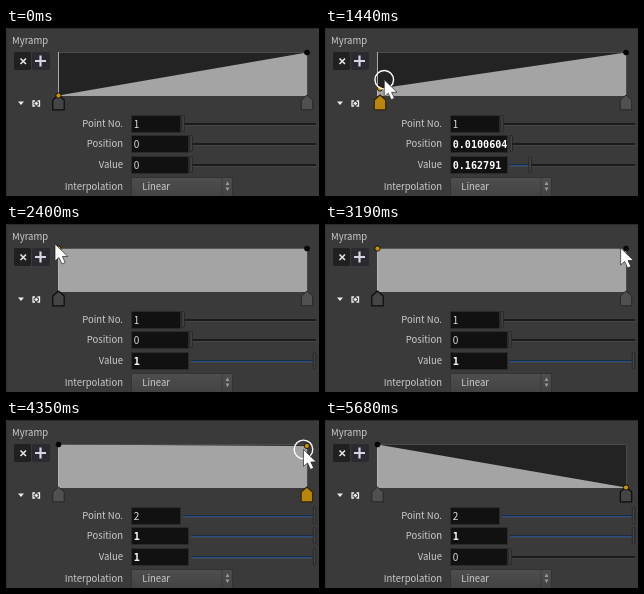
Recreate the animation shown at these times as an HTML page. Size 313 px wide and 168 px high, loop 6360 ms.

```html
<!DOCTYPE html>
<html lang="en">
<head>
<meta charset="utf-8">
<title>Ramp editor</title>
<style>
  html, body { margin: 0; width: 100%; height: 100%; overflow: hidden; background: #3a3a3a; }
  svg { display: block; width: 100vw; height: 100vh; }
  text { font: 9.5px "Noto Sans CJK JP", "Noto Sans CJK SC", "Noto Sans CJK", "Open Sans", sans-serif; fill: #ccc; }
  .label { text-anchor: end; }
  .value { font-size: 10px; fill: #e2e2e2; }
  .value.bold { font: bold 10.1px "DejaVu Sans Mono", monospace; fill: #fff; }
</style>
</head>
<body>
<svg viewBox="0 0 313 168">
  <defs>
    <linearGradient id="menu" x1="0" y1="0" x2="0" y2="1">
      <stop offset="0" stop-color="#4e4e4e"/><stop offset="1" stop-color="#424242"/>
    </linearGradient>
  </defs>
  <rect width="313" height="168" fill="#3a3a3a"/>
  <path d="M0 .5H313" stroke="#2b2b2b"/>
  <path d="M.5 0V168" stroke="#333"/>
  <text x="6" y="16">Myramp</text>

  <rect x="8" y="24" width="17" height="18" rx="1.5" fill="#202020"/>
  <rect x="26" y="24" width="18" height="18" rx="1.5" fill="#2a2a30"/>
  <path d="M14.5 30.500l5.500 5.500m0-5.500l-5.500 5.500" stroke="#e4e4e4" stroke-width="1.600"/>
  <path d="M29 33h11m-5.500-5.500v11" stroke="#d5d5e4" stroke-width="2.200"/>
  <path d="M12 73.500h6l-3 3.500z" fill="#eee"/>
  <path d="M29 73h-2v5h2m2.500 0h2v-5h-2M28.500 75.500h3.500M30.250 73.800v3.400" fill="none" stroke="#eee" stroke-width="1.300"/>

  <rect x="52" y="24" width="250" height="44" fill="#232323"/>
  <path id="fill" fill="#a4a4a4"/>
  <path d="M52 24.500H301.500V68" fill="none" stroke="#555" stroke-width=".8"/>
  <path d="M52.500 24V68" stroke="#ccc" stroke-width=".8"/>
  <g id="handles" stroke-linejoin="round"></g>
  <g id="dots" stroke="#000"></g>

  <g id="rows"></g>
  <text class="label" x="117" y="162">Interpolation</text>
  <rect x="125.500" y="149.500" width="101" height="20" rx="1.500" fill="url(#menu)" stroke="#333"/>
  <path d="M216 150V168" stroke="#3a3a3a"/>
  <text x="136.300" y="162">Linear</text>
  <path d="M219.500 157l2-3.500 2 3.500zM219.500 159.500l2 3.500 2-3.500z" fill="#999"/>

  <g id="cursor">
    <circle id="ring" r="9.300" fill="none" stroke="#fff" stroke-width="1.400"/>
    <path d="M0 0V17L4 13.500 7 20 10.200 18.500 7.400 12.500H12.800Z" fill="#fff" stroke="#222" stroke-width=".7" stroke-linejoin="round"/>
  </g>
</svg>
<script>
const LOOP = 6360;
const STEP = 88.5; // all times below count these steps
const NS = "http://www.w3.org/2000/svg";
const $ = id => document.getElementById(id);

function set(el, attrs) {
  for (const k in attrs) el.setAttribute(k, attrs[k]);
}

function add(parent, tag, attrs) {
  const el = document.createElementNS(NS, tag);
  set(el, attrs);
  return parent.appendChild(el);
}

const smooth = k => k * k * (3 - 2 * k);
const easeOut = k => 1 - (1 - k) ** 2.4;
const bump = k => Math.sin(Math.PI * k) ** 2;
const progress = (f, leg) =>
  leg.ease(Math.min(1, Math.max(0, (f - leg.from) / (leg.to - leg.from))));

// Pointer legs; bow bends the path sideways
const enter = { from: 6, to: 10, x: 52, y: 66, ease: smooth };
const raise = { from: 15, to: 22, x: 49, y: 20, ease: easeOut, bow: 12 };
const cross = { from: 27, to: 34, x: 289, y: 24, ease: smooth };
const settle = { from: 34, to: 41, x: 301, y: 24, ease: easeOut };
const lower = { from: 47, to: 56, x: 299, y: 67, ease: smooth, bow: -22 };
const leave = { from: 60, to: 63, x: 300, y: 143, ease: smooth };
const legs = [enter, raise, cross, settle, lower, leave];

function pointerAt(f) {
  let x = 61, y = 80;
  for (const leg of legs) {
    const k = progress(f, leg);
    x += (leg.x - x) * k + (leg.bow || 0) * bump(k);
    y += (leg.y - y) * k;
  }
  return [x, y];
}

function leftPoint(f) {
  const k = progress(f, raise);
  return [.042 * bump(k), k];
}

function rightPoint(f) {
  const k = progress(f, lower);
  return [1 - .0489 * bump(k), 1 - k];
}

const px = p => 52.5 + p * 248.5;
const py = v => 67.5 - v * 43;
const round = (v, n) => Math.round(v * n) / n;

function makeRow(name, y, width) {
  const g = add($("rows"), "g", { transform: `translate(0 ${y})` });
  const left = 128 + width, right = 308.5;
  add(g, "text", { class: "label", x: 117, y: 12.3 }).textContent = name;
  add(g, "rect", { x: 125.5, y: .5, width, height: 17, fill: "#111", stroke: "#2b2b2b" });
  const text = add(g, "text", { x: 127.7, y: 12.8 });
  add(g, "rect", { x: left, y: 8, width: 310 - left, height: 2, fill: "#1b1b1b" });
  add(g, "rect", { x: left, y: 10, width: 310 - left, height: .7, fill: "#4b4b4b" });
  const bar = add(g, "rect", { x: left, y: 8.7, height: 1.3, fill: "#24508a" });
  const knob = add(g, "rect", { y: .5, width: 2.5, height: 16, rx: 1, fill: "#464646", stroke: "#202020", "stroke-width": .8 });
  return (value, k, bold) => {
    const length = (right - left) * k;
    text.textContent = String(+value.toPrecision(6));
    text.setAttribute("class", bold ? "value bold" : "value");
    bar.setAttribute("width", length);
    knob.setAttribute("x", left + length - 1.2);
  };
}

const showNumber = makeRow("Point No.", 87, 49);
const showPosition = makeRow("Position", 107, 57);
const showValue = makeRow("Value", 128, 57);
const handles = [0, 1].map(() => add($("handles"), "path", { d: "M0 -8.500L5.700 -3.500V6.300H-5.700V-3.500Z" }));
const dots = [0, 1].map(() => add($("dots"), "circle", { r: 2.6 }));

function render(time) {
  const f = Math.floor(time / STEP);
  const within = (a, b) => f >= a && f < b;
  const active = f >= 42 ? 1 : 0;
  const pressed = within(14, 27) || within(42, 57);

  const points = [leftPoint(f - .5), rightPoint(f - 1)];
  const [[ax, ay], [bx, by]] = points.map(([p, v]) => [px(p), py(v)]);
  $("fill").setAttribute("d", `M52.500 68V${ay}H${ax}L${bx} ${by}H301V68Z`);

  points.forEach(([p, v], i) => {
    const on = i === active;
    set(handles[i], {
      transform: `translate(${px(p)} 75.500)`,
      fill: on && pressed ? "#b9850c" : on ? "#454545" : "#505050",
      stroke: on ? (pressed ? "#33270a" : "#0c0c0c") : "#242424",
      "stroke-width": on ? 1.2 : .9
    });
    set(dots[i], { cx: px(p), cy: py(v), fill: on ? "#c9900d" : "#000", "stroke-width": on ? .8 : .5 });
  });

  // The fields trail the dragged point
  const [p, v] = active ? rightPoint(pressed ? f - 1.71 : f) : points[0];
  const position = round(p, 497), value = round(v, 86);
  showNumber(active + 1, active, false);
  showPosition(position, position, position > 0);
  showValue(value, value, value > 0);

  const [x, y] = pointerAt(f);
  set($("cursor"), {
    transform: `translate(${x} ${y})`,
    visibility: within(6, 64) ? "visible" : "hidden"
  });
  $("ring").setAttribute("display", pressed ? "inline" : "none");
}

const start = performance.now();
function tick() {
  render((performance.now() - start) % LOOP);
  requestAnimationFrame(tick);
}
tick();
</script>
</body>
</html>
```
